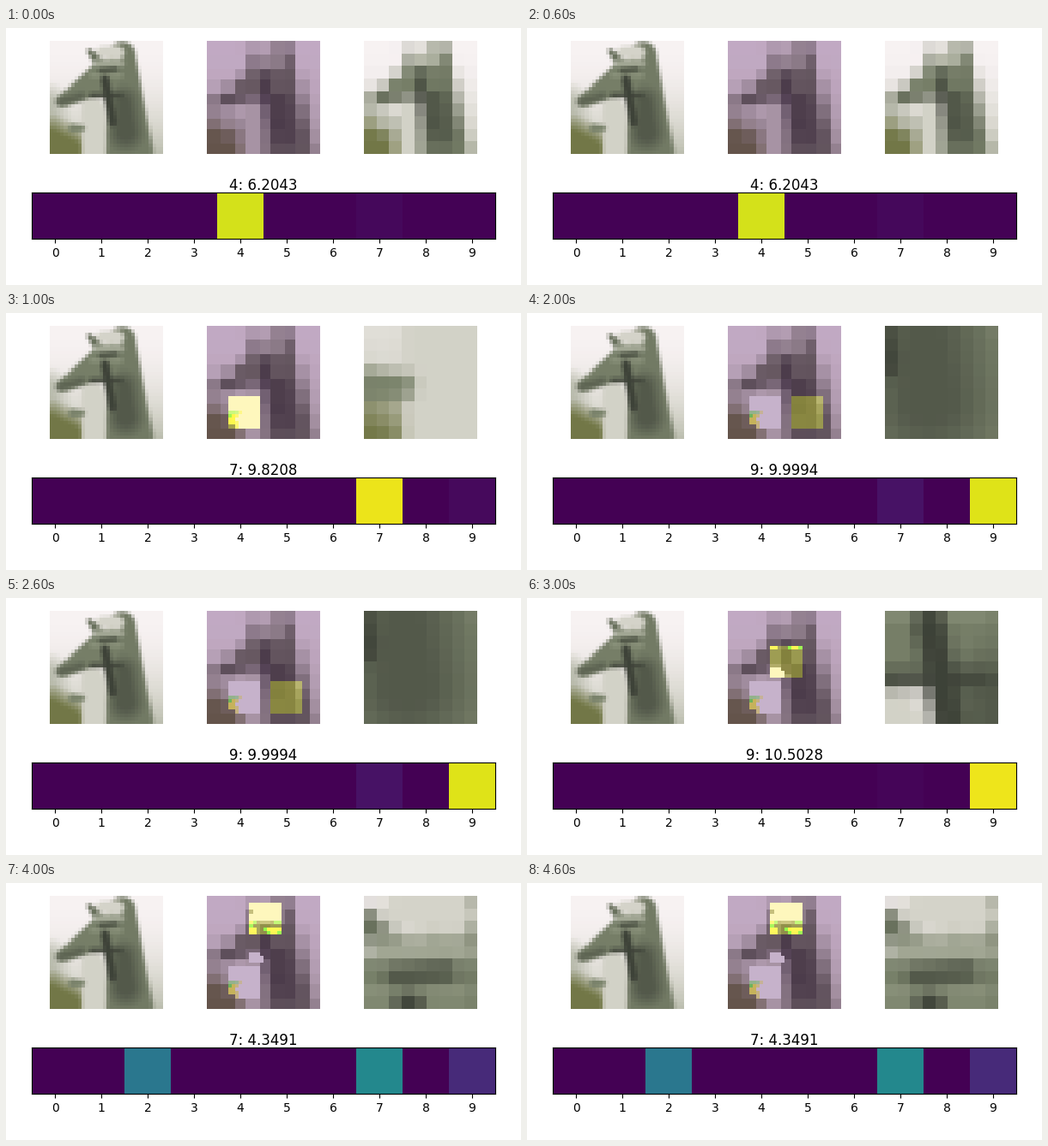
These frames come from a looping animation (600x300 px, 5000 ms). A matplotlib script:

```python
import numpy as np
import matplotlib.pyplot as plt
from matplotlib.animation import FuncAnimation
from matplotlib.colors import LinearSegmentedColormap

W, H = 600, 300
N, G = 32, 9            # picture and glimpse size, in cells
S = N * G               # fine raster that divides evenly into both
ALPHA = 0.3

axis = (np.arange(S) + 0.5) / G
Z = axis + 1j * axis[:, None]
stone = LinearSegmentedColormap.from_list("stone", [
    (0, "#1c1e1c"), (0.5, "#808970"), (0.82, "#d5d4ca"), (1, "#fcf6f8")])


def stroke(img, color, a, b, ra, rb, soft=1):
    """Round-ended stroke from a to b, its radius running from ra to rb."""
    t = np.clip(((Z - a) * np.conj(b - a)).real / abs(b - a) ** 2, 0, 1)
    d = abs(Z - a - t * (b - a))
    weight = np.clip((ra + t * (rb - ra) - d) / soft + 0.5, 0, 1)
    img += (np.array(color[:3]) - img) * weight[..., None]


def paint():
    """Horse statue from a few plain strokes over a soft sky."""
    sky = 0.98 - 0.26 * (Z.imag / N) ** 2
    img = stone(sky)[..., :3]
    olive = (0.45, 0.47, 0.28)

    # ground and pale chest
    stroke(img, stone(0.72), 0 + 17j, 0 + 26j, 3, 5, 5)
    stroke(img, olive, 0 + 29j, 8 + 32j, 6, 5, 5)
    stroke(img, stone(0.81), 12 + 19j, 14 + 32j, 3, 5)

    # neck, head, ear
    stroke(img, stone(0.43), 20.5 + 4j, 22.5 + 31j, 3.7, 6.6)
    stroke(img, stone(0.45), 15.5 + 10j, 3.8 + 17j, 4.6, 1.8)
    stroke(img, stone(0.38), 11.3 + 3j, 14 + 6j, 0.7, 1.3)

    # highlights
    stroke(img, stone(0.82), 14.8 + 3.2j, 19 + 3.4j, 1.6, 2)
    stroke(img, stone(0.63), 13.5 + 6.3j, 20 + 6.3j, 1, 1)
    stroke(img, stone(0.54), 12 + 9.8j, 20 + 9.8j, 0.7, 0.7)

    # shadows
    stroke(img, stone(0.26), 14.5 + 8.4j, 18.5 + 8j, 0.8, 0.8)
    stroke(img, stone(0.31), 3 + 17.2j, 9 + 15.6j, 1, 1, 2)
    stroke(img, stone(0.28), 21 + 17j, 21.5 + 26j, 3, 4, 4)
    stroke(img, stone(0.2), 12 + 15.4j, 20 + 15.4j, 0.7, 0.7)
    stroke(img, stone(0.17), 15.6 + 11j, 17.8 + 23j, 1.2, 1.2)
    stroke(img, stone(0.47), 6.5 + 24.8j, 9 + 24.8j, 1.3, 1)
    return img


def shrink(img, n):
    k = S // n
    return img.reshape(n, k, n, k, 3).mean(axis=(1, 3))


fine = paint()
photo, coarse = shrink(fine, N), shrink(fine, G)
cell = np.arange(N) * G // N
viridis = plt.get_cmap("viridis")

# window corner (column, row), score, leading chances by class
steps = [
    (None, 6.2043, {4: 0.935, 7: 0.022}),
    ((6, 20), 9.8208, {7: 0.97, 9: 0.024}),
    ((18, 20), 9.9994, {9: 0.95, 7: 0.047}),
    ((12, 10), 10.5028, {9: 0.975, 7: 0.014}),
    ((12, 2), 4.3491, {7: 0.465, 2: 0.395, 9: 0.12}),
]


def window(corner):
    x, y = corner
    return slice(y, y + G), slice(x, x + G)


def glimpse(i):
    corner = steps[i][0]
    return photo[window(corner)] if corner else coarse


def memory(i):
    """Coarse view, with bright parts of visited windows burnt in."""
    img = coarse[cell][:, cell].copy()
    mask = np.zeros((N, N))
    for corner, *_ in steps[1:i + 1]:
        w = window(corner)
        img[w] = np.where(photo[w] > 0.5, 1, img[w])
        mask[:] = 0
        mask[w] = 1
    return (1 - ALPHA) * img + ALPHA * viridis(mask)[..., :3]


def chances(i):
    """Leading classes as given, the rest shared out evenly."""
    lead = steps[i][2]
    rest = (1 - sum(lead.values())) / (10 - len(lead))
    return [[lead.get(k, rest) for k in range(10)]]


def headline(i):
    _, score, lead = steps[i]
    return f"{max(lead, key=lead.get)}: {score:.4f}"


fig = plt.figure(figsize=(W / 100, H / 100), dpi=100, facecolor="white")


def add_axes(left, right, top, bottom):
    grid = fig.add_gridspec(1, 1, left=left / W, right=right / W,
                            top=1 - top / H, bottom=1 - bottom / H)
    return fig.add_subplot(grid[0])


def panel(center, img):
    half = 65.95
    ax = add_axes(center - half, center + half, 81 - half, 81 + half)
    ax.axis("off")
    return ax.imshow(img, interpolation="nearest", aspect="auto")


panel(117, photo)
mid = panel(300, memory(0))
right = panel(483, glimpse(0))

bar_ax = add_axes(30, 570, 192, 246)
bar = bar_ax.imshow(chances(0), cmap="viridis", vmin=0, vmax=1,
                    interpolation="nearest", aspect="auto")
bar_ax.set_xticks(range(10))
bar_ax.set_yticks([])
title = bar_ax.set_title(headline(0), fontsize=12, x=0.5001, y=1, pad=2)


def update(i):
    mid.set_data(memory(i))
    right.set_data(glimpse(i))
    bar.set_data(chances(i))
    title.set_text(headline(i))
    return mid, right, bar, title


anim = FuncAnimation(fig, update, frames=len(steps), interval=1000,
                     repeat=True, repeat_delay=0, blit=False)
plt.show()
```
